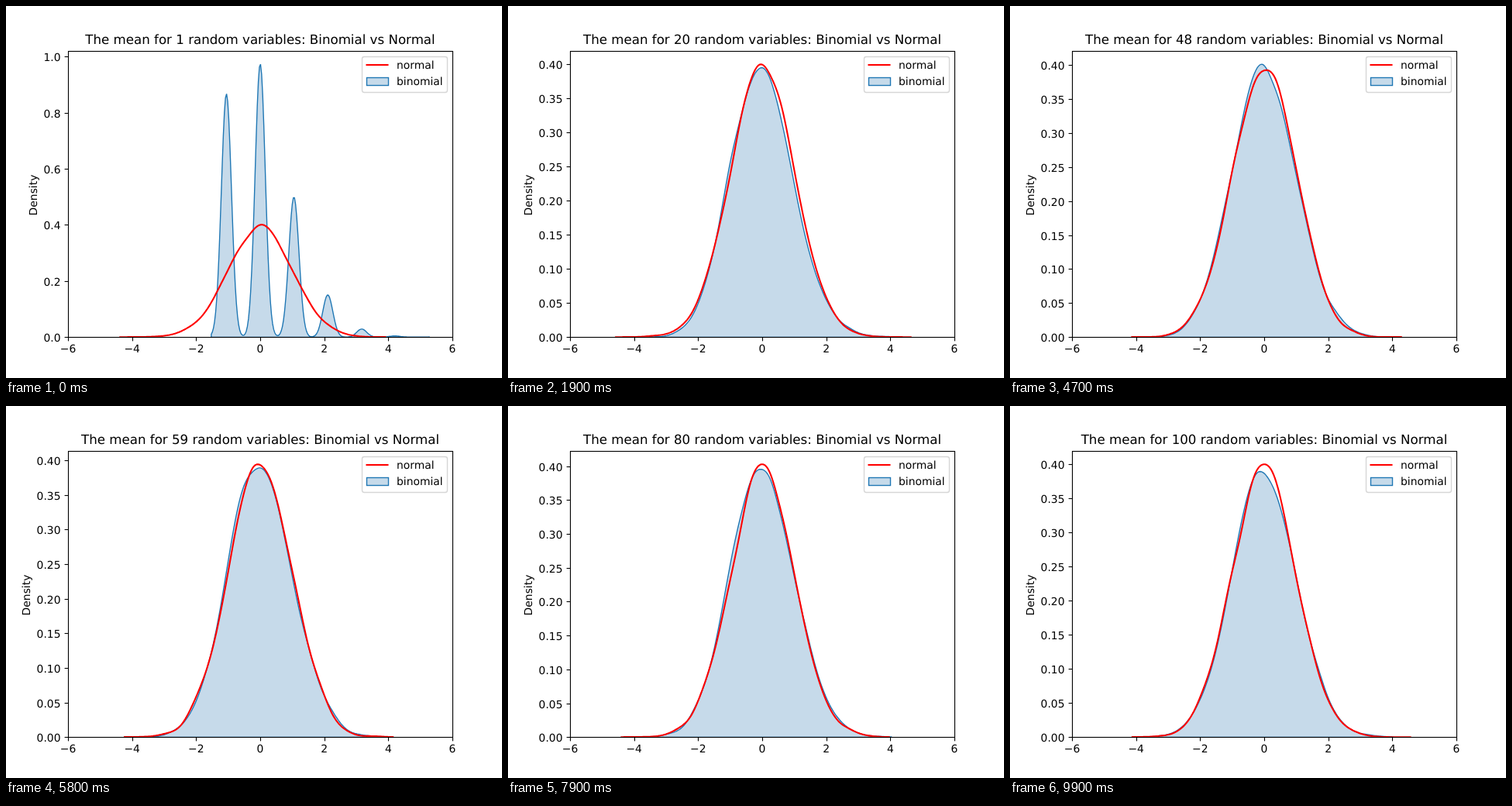
An HTML page that plays this animation: 640 by 480 pixels, repeating every 10000 ms.

```html
<!DOCTYPE html>
<html lang="en">
<head>
<meta charset="utf-8">
<title>Binomial vs Normal</title>
<style>
  html, body { margin: 0; width: 100%; height: 100%; overflow: hidden; background: #fff; }
  svg { display: block; width: 640px; height: 480px; }
  text { font: 13.889px "DejaVu Sans", sans-serif; text-rendering: geometricPrecision; }
  #title { font-size: 16.667px; }
  .mid { text-anchor: middle; }
  .end { text-anchor: end; }
  .axis { fill: none; stroke: #000; stroke-width: 1.11; }
  .area { fill: #c6daea; stroke: #1f77b4; stroke-width: 1.39; }
  .line { fill: none; stroke: #f00; stroke-width: 2.08; stroke-linecap: square; stroke-linejoin: round; }
  .box { fill: #fff; fill-opacity: .8; stroke: #ccc; stroke-opacity: .8; stroke-width: 1.39; }
</style>
</head>
<body>
<svg viewBox="0 0 640 480">
  <defs><clipPath id="plot"><rect x="80" y="57.6" width="496" height="369.6"/></clipPath></defs>
  <g clip-path="url(#plot)">
    <path id="area" class="area"/>
    <path id="line" class="line"/>
  </g>
  <g id="xTicks"></g>
  <g id="yTicks"></g>
  <rect class="axis" x="80.5" y="58.5" width="496" height="369"/>
  <text id="title" class="mid" x="328" y="49"></text>
  <text id="yName" class="mid">Density</text>
  <rect class="box" x="459.5" y="65.5" width="110" height="46" rx="2.8"/>
  <path class="line" d="M465.5 76H492.5"/>
  <rect class="area" x="465.5" y="92.5" width="28" height="10"/>
  <text x="504" y="81">normal</text>
  <text x="504" y="102">binomial</text>
</svg>
<script>
const $ = id => document.getElementById(id);
const LEFT = 80, BOTTOM = 427.2, HEIGHT = 369.6, UNIT = 496 / 12;
const BANDWIDTH = 0.158, CUT = 3 * BANDWIDTH, POINTS = 200;
const TRIALS = 10, CHANCE = 0.1;
const FRAME = 100, COUNT = 100;
const NOISE = 0.005, NOISE_WIDTH = 0.22;

const gauss = (x, width) => Math.exp(-x * x / (2 * width * width));
const peakOf = width => 1 / (width * Math.sqrt(2 * Math.PI));
const toX = x => LEFT + (x + 6) * UNIT;
const snap = v => Math.floor(v + 0.5) + 0.5;

// The standard normal density, widened by the smoothing kernel.
const SPREAD = Math.hypot(1, BANDWIDTH);
const PEAK = peakOf(SPREAD);
const normal = x => PEAK * gauss(x, SPREAD);

function seeded(seed) {
  let s = seed * 7919;
  return () => {
    s = (s + 0x6D2B79F5) | 0;
    let r = Math.imul(s ^ (s >>> 15), 1 | s);
    r = (r + Math.imul(r ^ (r >>> 7), 61 | r)) ^ r;
    return ((r ^ (r >>> 14)) >>> 0) / 4294967296;
  };
}

// Smoothed density of the standardised sum of n binomial draws.
function binomial(n) {
  const size = TRIALS * n, mean = size * CHANCE, sd = Math.sqrt(mean * (1 - CHANCE));
  const weights = [(1 - CHANCE) ** size];
  for (let k = 1; k <= size; k++) {
    weights[k] = weights[k - 1] * (size - k + 1) / k * CHANCE / (1 - CHANCE);
  }
  const reach = 6 * BANDWIDTH;
  return x => {
    const from = Math.max(0, Math.ceil(mean + (x - reach) * sd));
    const to = Math.min(size, Math.floor(mean + (x + reach) * sd));
    let sum = 0;
    for (let k = from; k <= to; k++) sum += weights[k] * gauss(x - (k - mean) / sd, BANDWIDTH);
    return sum * peakOf(BANDWIDTH);
  };
}

// Adds the wobble of a finite sample, which grows with the root of the density.
function sampled(density, rand) {
  const bumps = [];
  for (let x = -3.5; x <= 4; x += 0.25) {
    const z = Math.sqrt(-2 * Math.log(1 - rand())) * Math.cos(2 * Math.PI * rand());
    bumps.push([x, NOISE * z]);
  }
  return x => {
    const wobble = bumps.reduce((sum, [at, h]) => sum + h * gauss(x - at, NOISE_WIDTH), 0);
    const d = density(x);
    return Math.max(0, d + Math.sqrt(d / PEAK) * wobble);
  };
}

function curve(density, min, max) {
  const lo = min - CUT, hi = max + CUT;
  return Array.from({ length: POINTS }, (_, i) => {
    const x = lo + (hi - lo) * i / (POINTS - 1);
    return [x, density(x)];
  });
}

function draw(n) {
  const rand = seeded(n);
  const line = curve(sampled(normal, rand), -3.6 - 0.5 * rand(), 3.4 + 0.8 * rand());
  const lowest = -Math.sqrt(n * TRIALS * CHANCE / (1 - CHANCE));
  const area = curve(sampled(binomial(n), rand), Math.max(-3.3, lowest), 3.4 + 1.4 / Math.sqrt(n));
  const top = 1.05 * Math.max(...line.concat(area).map(p => p[1]));

  const toY = v => BOTTOM - v / top * HEIGHT;
  const path = pts => pts.map(([x, v]) => toX(x).toFixed(2) + " " + toY(v).toFixed(2)).join("L");
  const base = BOTTOM + 0.3;
  $("line").setAttribute("d", "M" + path(line));
  $("area").setAttribute("d", `M${toX(area[0][0])} ${base}L${path(area)}V${base}Z`);

  const step = [0.05, 0.1, 0.2].find(s => s * 9 >= top);
  const digits = step < 0.1 ? 2 : 1;
  let ticks = "";
  for (let k = 0; k * step <= top; k++) {
    const y = snap(toY(k * step));
    ticks += `<path class="axis" d="M75.6 ${y}H80.5"/>` +
      `<text class="end" x="70.5" y="${y + 5}">${(k * step).toFixed(digits)}</text>`;
  }
  $("yTicks").innerHTML = ticks;
  $("yName").setAttribute("transform", `translate(${digits === 2 ? 31 : 40} 244) rotate(-90)`);
  $("title").textContent = `The mean for ${n} random variables: Binomial vs Normal`;
}

let xTicks = "";
for (let v = -6; v <= 6; v += 2) {
  const x = snap(toX(v));
  xTicks += `<path class="axis" d="M${x} 427.5V432.4"/>` +
    `<text class="mid" x="${toX(v)}" y="447">${v < 0 ? "\u2212" : ""}${Math.abs(v)}</text>`;
}
$("xTicks").innerHTML = xTicks;

const start = performance.now();
let shown = 0;
function tick() {
  const n = Math.floor((performance.now() - start) / FRAME) % COUNT + 1;
  if (n !== shown) draw(shown = n);
  requestAnimationFrame(tick);
}
tick();
</script>
</body>
</html>
```
